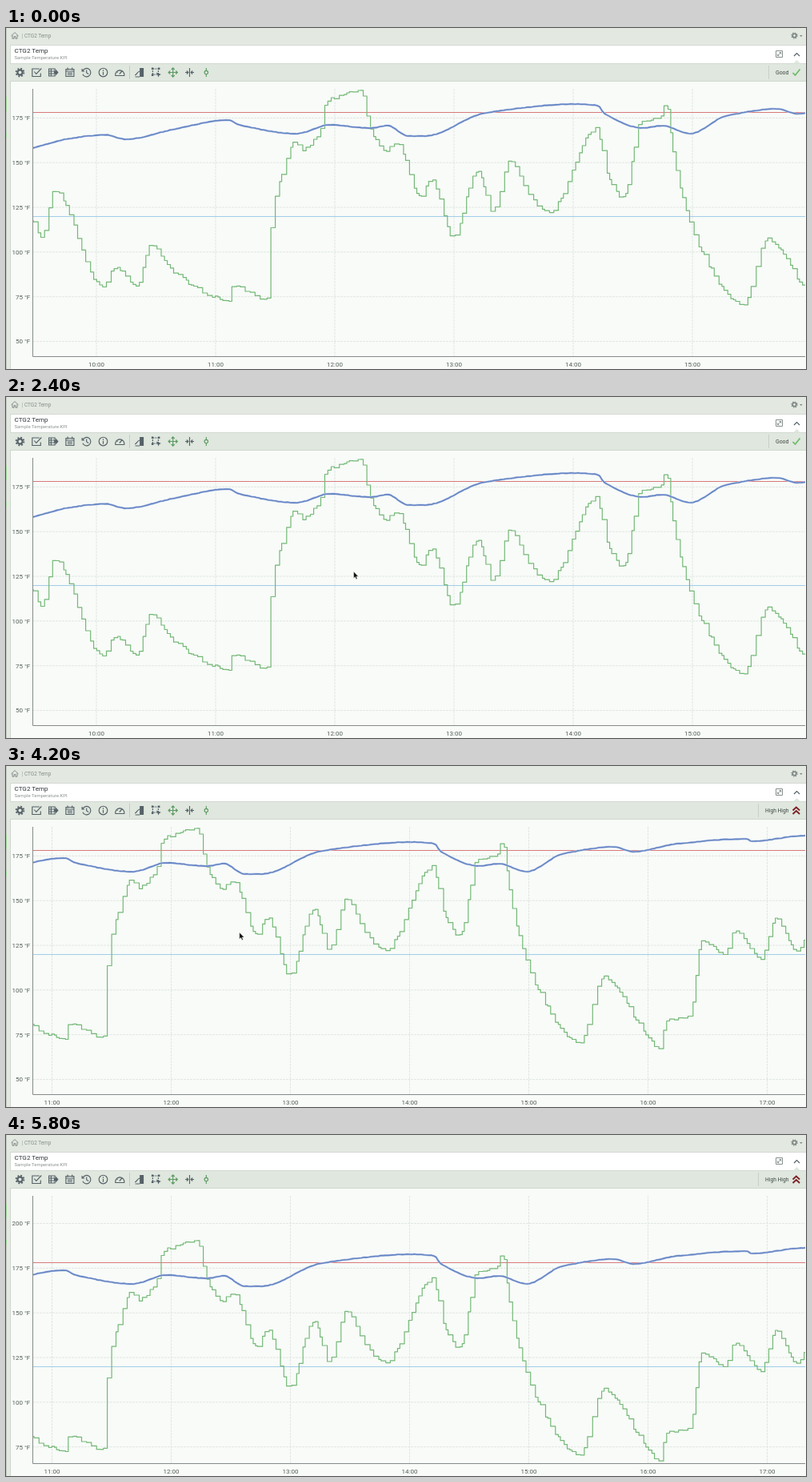
These frames come from a looping animation (1000 by 426 pixels, 6400 ms). An HTML page:

```html
<!DOCTYPE html>
<html lang="en">
<head>
<meta charset="utf-8">
<title>CTG2 Temp</title>
<style>
  html, body { margin: 0; width: 100%; height: 100%; overflow: hidden; background: #e3e9e1; }
  svg { display: block; width: 100vw; height: 100vh; font-family: Roboto, "Open Sans", sans-serif; }
  .line { fill: none; stroke-linejoin: round; }
  .icon { fill: none; stroke: #566168; stroke-width: 1.15; }
  .icon .solid { fill: #566168; stroke: none; }
  .icon .move { stroke: #5d9a62; }
  .pale { stroke: #7b8583; stroke-width: .9; }
  .grid { stroke: #e2e7e3; stroke-width: 1; stroke-dasharray: 3 1; }
  .label { font-size: 8px; fill: #545c59; }
</style>
</head>
<body>
<svg viewBox="0 0 1000 426" preserveAspectRatio="none">
  <defs>
    <clipPath id="plot"><rect x="34" y="75" width="965" height="335"/></clipPath>
    <clipPath id="known"><rect id="span" x="34" y="0" height="426"/></clipPath>
    <g id="gear">
      <circle r="3.1" stroke-width="2.2"/>
      <circle r="4.9" stroke-width="1.7" stroke-dasharray="2 1.85"/>
    </g>
  </defs>

  <rect width="1000" height="426" fill="#e3e9e1"/>
  <rect width="1" height="426" fill="#c0c8bf"/>
  <path d="M0 86h1v18h-1zM0 131h1v6h-1z" fill="#9bd694"/>
  <rect x="5.5" y="21.5" width="995" height="23" fill="#fff" stroke="#d3d9d2"/>
  <rect x="5" y="45" width="995" height="21" fill="#dfe7de"/>
  <rect x="5" y="66" width="995" height="360" fill="#f8fbf8"/>
  <path d="M5.5 66V426M5 66.5H1000" stroke="#d0d7cf" fill="none"/>

  <!-- breadcrumb and title -->
  <g class="icon pale">
    <path d="M6.5 9.8L11 5.6l4.5 4.2M8 9v4.2h2.1v-2.7h1.8v2.7H14V9"/>
    <use href="#gear" transform="translate(985.5 9.5) scale(.72)"/>
    <path d="M992 9h3.6l-1.8 2z" fill="#7b8583" stroke="none"/>
    <path d="M962.5 28.5h8v8h-8zM966.5 30.5h2.2v2.2M966.5 34.7h-2.2v-2.2M968.5 30.6l-4 4"/>
    <path d="M985 35l3.5-3.5L992 35" stroke="#566168" stroke-width="1.2"/>
  </g>
  <text x="19.5" y="12" font-size="6.4" fill="#9aa19e">|</text>
  <text x="23" y="12" font-size="6.4" fill="#858d89">CTG2 Temp</text>
  <text x="10.5" y="31" font-size="8.1" fill="#30363a">CTG2 Temp</text>
  <text x="10.5" y="39.3" font-size="6" fill="#8b9390">Sample Temperature.KPI</text>
  <path d="M984 44.5l4.5-4.5 4.5 4.5z" fill="#dfe7de"/>

  <g id="tools" class="icon"></g>
  <path d="M154.5 47v17" stroke="#c3cbc3"/>

  <g id="good">
    <path d="M953.5 47v17" stroke="#c8d0c7"/>
    <text x="962" y="58" font-size="6.9" fill="#3e4643">Good</text>
    <path d="M983.5 56l3 3 6-7.5" fill="none" stroke="#6dbb69" stroke-width="1.7"/>
  </g>
  <g id="high">
    <path d="M940.5 47v17" stroke="#c8d0c7"/>
    <text x="949" y="58" font-size="6.7" fill="#3e4643">High High</text>
    <path d="M983.5 55.5l4.3-4 4.3 4M983.5 60l4.3-4 4.3 4" fill="none" stroke="#7d2226" stroke-width="1.9"/>
  </g>

  <!-- chart -->
  <g id="axes"></g>
  <g clip-path="url(#plot)">
    <g id="series" clip-path="url(#known)">
      <path d="M34 105.5H1205" class="line" stroke="#d8797b"/>
      <path d="M34 235.5H1205" class="line" stroke="#a3cdea"/>
      <path id="temp" class="line" stroke="#74b876" stroke-width="1.2"/>
      <path id="glow" class="line" stroke="#c6d2eb" stroke-width="2.7"/>
      <path id="mean" class="line" stroke="#6484c4" stroke-width="1.6"/>
    </g>
  </g>
  <path d="M33.5 76V410.5H999" fill="none" stroke="#858c88"/>
  <path id="cursor" d="M0 0V8.4L1.9 6.7 3.2 9.7 4.7 9 3.4 6.2H6z" fill="#111" stroke="#fff" stroke-width=".5"/>
</svg>

<script>
const $ = id => document.getElementById(id);
const LOOP = 6400, STEP = 100, LOAD = 4000;
const HOUR = 149, TEN = 113, DEG = 55.85 / 25, Y175 = 112.3;
const START = 34, NOW = 999, END = 1205;

const tools = [
  '<use href="#gear"/>',
  '<path d="M3.5-4.5H-5.5v9.5H5V1M-3-1l2.5 3L6-5"/>',
  '<path d="M-5.5-4.5H2v9h-7.5zM-5.5-1.5H2M-5.5 1.5H2M-2.7-4.5v9"/><path class="solid" d="M1-1.5h2V-4L6.5 0 3 4V1.5H1z"/>',
  '<path d="M-5-4H5v9H-5zM-5-1.5H5M-2.8-6v3M2.8-6v3M-3 .8h6M-3 3h6"/>',
  '<path d="M-4.8-2A5.2 5.2 0 1 1-4.8 2.3M0-3V.5L2.5 2M-5.6-4.5v3h3"/>',
  '<circle r="5.3"/><path d="M0-.8V3.2M0-3.2v1.5"/>',
  '<path d="M-5.5 4A5.6 5.6 0 1 1 5.5 4zM-.5 2L3-2M-3.5 0h1M0-3.5v1"/>',
  '<path class="solid" d="M0-5.5h5V5.5H0z"/><path d="M-6 3.5C-4 3.5-3-1 0-1.5M-5.5 5.5H0"/>',
  '<path d="M-4.5-4.5h7v7h-7z" stroke-dasharray="2 1"/><path class="solid" d="M0 0l6 2.5-2.3 1L2.8 6zM-6-6h2.5v2.5H-6zM2-6h2.5v2.5H2zM-6 2h2.5v2.5H-6z"/>',
  '<path class="move" d="M0-5.5v11M-5.5 0h11M-2-3.5L0-5.6l2 2.1M-2 3.5L0 5.6l2-2.1M-3.5-2L-5.6 0l2.1 2M3.5-2L5.6 0 3.5 2"/>',
  '<path d="M0-5.5v11M-5.5 0h3.7M1.8 0h3.7M-3.7-2L-1.7 0l-2 2M3.7-2L1.7 0l2 2"/>',
  '<path class="move" d="M0-5.5v3M0 2.5v3"/><circle class="move" r="2.2"/>'
];
const toolX = i => 17.5 + i * 20.8 + (i > 6 ? 4 : 0);
$('tools').innerHTML = tools.map((d, i) => `<g transform="translate(${toolX(i)} 55.5)">${d}</g>`).join('');

// Turning points, x and y in the first view
const tempKeys = [
  [34, 240], [47, 261], [62, 202], [122, 322], [140, 299], [166, 323], [182, 270], [213, 306],
  [281, 340], [285, 323], [328, 340], [335, 228], [348, 181], [365, 137], [369, 153], [395, 128],
  [402, 92], [446, 78], [456, 121], [476, 154], [491, 142], [519, 211], [534, 190], [561, 262],
  [591, 178], [610, 229], [632, 166], [655, 206], [680, 230], [740, 125], [754, 184], [774, 212],
  [786, 158], [794, 117], [820, 113], [827, 91], [838, 168], [870, 275], [923, 346], [953, 264],
  [999, 323], [1026, 355], [1030, 320], [1062, 310], [1076, 217], [1104, 235], [1118, 206],
  [1150, 240], [1169, 191], [1196, 233], [1205, 219]
];
const meanKeys = [
  [34, 150], [80, 138], [125, 133.5], [149, 139], [212, 126], [278, 115], [292, 121], [363, 132],
  [405, 121], [455, 125], [477, 122], [503, 135], [523, 135], [600, 106], [715, 95], [740, 97],
  [748, 107], [797, 125], [820, 122], [855, 132], [900, 110], [965, 101], [988, 107], [1045, 97],
  [1130, 91], [1136, 94], [1205, 87]
];

let seed = 7;
const rand = () => (seed = seed * 16807 % 2147483647) / 2147483647;

// Smooth curve that never overshoots its keys
function spline(keys) {
  const rise = i => keys[i + 1] ? (keys[i + 1][1] - keys[i][1]) / (keys[i + 1][0] - keys[i][0]) : 0;
  const slope = keys.map((_, i) => {
    const a = i ? rise(i - 1) : rise(0), b = rise(i);
    return a * b > 0 ? 2 * a * b / (a + b) : 0;
  });
  return x => {
    const i = Math.max(0, Math.min(keys.length - 2, keys.findIndex(k => k[0] > x) - 1));
    const [x0, y0] = keys[i], [x1, y1] = keys[i + 1];
    const w = x1 - x0, p = Math.min(1, (x - x0) / w), q = 1 - p;
    return y0 * q * q * (1 + 2 * p) + y1 * p * p * (3 - 2 * p) + w * p * q * (slope[i] * q - slope[i + 1] * p);
  };
}

// Each reading holds until the next one
function stairs(f) {
  let d = `M${START} ${f(START)}`;
  for (let x = START; x < END; x += 2.5 + rand() * 4) {
    d += `H${x.toFixed(1)}V${(f(x + 2.2) + (rand() - .5) * 4).toFixed(1)}`;
  }
  return d + 'H' + END;
}
function smooth(f) {
  let d = '';
  for (let x = START; x <= END; x += 3) d += `${d ? 'L' : 'M'}${x} ${(f(x) + (rand() - .5) * .6).toFixed(2)}`;
  return d;
}
$('temp').setAttribute('d', stairs(spline(tempKeys)));
const mean = smooth(spline(meanKeys));
$('mean').setAttribute('d', mean);
$('glow').setAttribute('d', mean);

// Progress from 0 to 1 between two times
const ramp = (t, from, to, power = 1) => Math.min(1, Math.max(0, (t - from) / (to - from))) ** power;

function motion(t) {
  const enter = ramp(t, 100, 500), settle = ramp(t, 600, 1000), drag = ramp(t, 2300, 3300, 1.15);
  const back = ramp(t, 3900, 4700), lift = ramp(t, 4700, 5200), leave = ramp(t, 5500, 5800);
  return {
    dx: 204.5 * ramp(t, 2400, 3300, 1.4),
    dy: 54 * lift,
    cx: 520 - 60 * enter - 10 * settle - 219 * drag + 162 * back + 60 * leave,
    cy: 400 - 155 * enter - 27 * settle - 27 * back + 54 * lift + 200 * leave
  };
}

function axes(dx, dy) {
  let out = '';
  for (let h = 9; h <= 18; h++) {
    const x = TEN + (h - 10) * HOUR - dx;
    if (x < 34 || x > 999) continue;
    out += `<path class="grid" d="M${x} 76V410"/><text class="label" text-anchor="middle" x="${x}" y="422.5">${h}:00</text>`;
  }
  for (let f = 50; f <= 200; f += 25) {
    const y = Y175 + (175 - f) * DEG + dy;
    if (y < 76 || y > 410) continue;
    out += `<path class="grid" d="M34 ${y}H999"/><text class="label" text-anchor="end" x="30.3" y="${y + 2.8}">${f} °F</text>`;
  }
  return out;
}

const show = (id, on) => $(id).style.display = on ? '' : 'none';
let last = -1;
function draw(now) {
  const t = Math.floor(now % LOOP / STEP) * STEP;
  if (t !== last) {
    last = t;
    const loaded = t >= LOAD, { dx, dy, cx, cy } = motion(t);
    $('axes').innerHTML = axes(dx, dy);
    $('series').setAttribute('transform', `translate(${-dx} ${dy})`);
    $('span').setAttribute('width', (loaded ? END : NOW) - START);
    $('cursor').setAttribute('transform', `translate(${cx} ${cy})`);
    show('cursor', t >= 200 && t < 5800);
    show('good', !loaded);
    show('high', loaded);
  }
  requestAnimationFrame(draw);
}
draw(performance.now());
</script>
</body>
</html>
```
